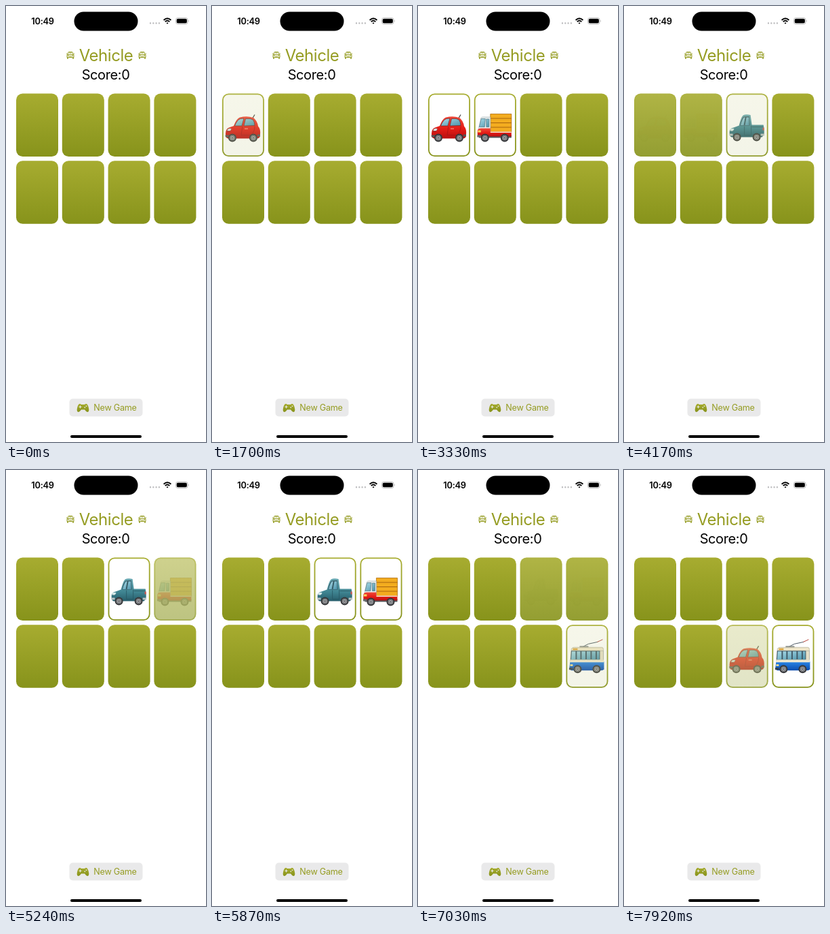
An HTML page for the animation above (8000 ms loop, 295x640 px).

```html
<!DOCTYPE html>
<html lang="en">
<head>
<meta charset="utf-8">
<title>Vehicle memory game</title>
<style>
  html, body { margin: 0; width: 100%; height: 100%; overflow: hidden; background: #fff; }
  svg { display: block; width: 100%; height: 100%; }
  text { font-family: Inter, "Open Sans", sans-serif; text-anchor: middle; letter-spacing: -.02em; }
</style>
</head>
<body>
<svg viewBox="0 0 295 640">
  <defs>
    <linearGradient id="olive" x2="0" y2="1">
      <stop stop-color="#a7ac30"/><stop offset="1" stop-color="#87931b"/>
    </linearGradient>
    <linearGradient id="red" x2="0" y2="1">
      <stop stop-color="#f0493a"/><stop offset=".55" stop-color="#e51d17"/><stop offset="1" stop-color="#b80f10"/>
    </linearGradient>
    <linearGradient id="teal" x2="0" y2="1">
      <stop stop-color="#6aa9b3"/><stop offset=".6" stop-color="#3f8491"/><stop offset="1" stop-color="#265c6a"/>
    </linearGradient>
    <linearGradient id="glass" x2="1" y2="1">
      <stop stop-color="#a9dbe8"/><stop offset="1" stop-color="#4d93ab"/>
    </linearGradient>
    <linearGradient id="blue" x2="0" y2="1">
      <stop stop-color="#2a86e6"/><stop offset="1" stop-color="#0b4cae"/>
    </linearGradient>
    <g id="wheel">
      <circle r="6" fill="#38393c"/><circle r="3.8" fill="#a9abae"/>
      <circle r="2.8" fill="none" stroke="#626468"/><circle r="1" fill="#4a4b4e"/>
    </g>
    <g id="car">
      <path d="M45 36L48 31" stroke="#444" stroke-width="1.3"/>
      <path fill="url(#red)" d="M5 59Q5 52 10 50L17 47.500Q21 37 26 35Q37 32.500 46 35.500Q52 40 53 48Q57 52 56 61Q56 66 51 66H9Q5 66 5 59Z"/>
      <path fill="url(#glass)" stroke="#71201f" stroke-width=".7" d="M18.500 47.500Q22 38.500 27 37L32 36.500L29 47.500ZM32 47.500L34.500 37Q42 36 45.500 38.500Q48 42 48 47Z"/>
      <path fill="none" stroke="#a81514" stroke-width=".8" d="M30 48L28 61H42Q48 57 48 48M6 56H12"/>
      <path fill="#dce9ec" stroke="#8d2525" stroke-width=".6" d="M8 52Q12 50 14 52L12 55H7Z"/>
      <path fill="#555" d="M4.500 61H10V64H5ZM52 60H56V63H52Z"/>
      <path fill="#f78b7b" d="M33 51H38V52.300H33Z"/>
      <use href="#wheel" x="15" y="65"/><use href="#wheel" x="46" y="65"/>
    </g>
    <g id="truck">
      <path fill="#525458" d="M7 61H55V65H7Z"/>
      <path fill="#f3ac1f" stroke="#ae6e10" stroke-width=".8" d="M24 30H55V57H24Z"/>
      <path stroke="#a8650f" d="M24 36.500H55M24 43H55M24 49.500H55"/>
      <path fill="#e8edee" stroke="#9da9ad" stroke-width=".6" d="M6 54L10 36Q10.500 34.500 13 34.500H24V56H6Z"/>
      <path fill="url(#glass)" stroke="#517784" stroke-width=".7" d="M7.500 49L10.500 37H16.500L15.500 49ZM18 37.500H22V49H18Z"/>
      <path fill="url(#red)" d="M5 54Q6 51 10 51H24V56H55V63H6Q4.500 63 5 54Z"/>
      <path fill="#f9d25a" d="M5.500 54H10V57H5.500Z"/>
      <path fill="#eee8d4" d="M24 56H55V57.500H24Z"/>
      <path fill="#67696c" d="M4.500 61H10V64H4.500Z"/>
      <use href="#wheel" x="16" y="65"/><use href="#wheel" x="45" y="65"/>
    </g>
    <g id="pickup">
      <path fill="url(#teal)" d="M5 57Q5 51 11 50L19 47Q22 35 25 32Q29 30 36 31.500L38 46H55Q56.500 51 56 60L53 64H8Q5 63 5 57Z"/>
      <path fill="#365b66" d="M20.500 47Q23 36 26 34L34 33.500L35 47Z"/>
      <path fill="url(#glass)" d="M21.500 46.500Q24 37 26.500 35L28 35L26 46.500ZM28 46.500L30 35H33.500L34 46.500Z"/>
      <path fill="none" stroke="#285762" stroke-width=".8" d="M27 48V61H37V47M38 49H54M6 55H11"/>
      <path fill="#d7e9e9" d="M6 52Q10 50.500 12 52L10 55H6Z"/>
      <path fill="#d6554b" d="M54 50H56V54H54Z"/>
      <path fill="#b9c2c4" d="M4.500 59H10V62H5ZM51 59H56.500V62H51Z"/>
      <use href="#wheel" x="16" y="64"/><use href="#wheel" x="45" y="64"/>
    </g>
    <g id="bus">
      <path fill="none" stroke="#4d5964" d="M25 32L33 28L47 25"/>
      <path fill="none" stroke="#b9483f" d="M46 25.200L54 21.500"/>
      <path fill="#8e938f" d="M20 31H33V34H20Z"/>
      <path fill="#eee5c9" stroke="#aaa58e" stroke-width=".6" d="M8 35Q9 33 12 33H53Q55 33 55 36V57H6Z"/>
      <path fill="#d9a23c" d="M10 34.500H17V37H10Z"/>
      <path fill="#405966" d="M7.500 38H55V51H6.500Z"/>
      <path fill="url(#glass)" d="M8.500 39H14V51H7.500ZM16 39H21V51H16ZM23 39H28.500V51H23ZM30.500 39H36V51H30.500ZM38 39H43.500V51H38ZM45.500 39H49V51H45.500Z"/>
      <path fill="#e6dfc7" d="M50 38H55V56H50Z"/>
      <path fill="url(#blue)" d="M6 54H56V65Q55 67 52 67H8Q5 66 5 62Z"/>
      <path fill="#f2ead2" d="M5.800 52.500H55.500V55H5.500Z"/>
      <path fill="#ffe58c" d="M6 58H10V60.500H6Z"/>
      <path fill="#333f4b" d="M4.500 63H10V66H4.500Z"/>
      <use href="#wheel" x="17" y="65"/><use href="#wheel" x="45" y="65"/>
    </g>
    <g id="carIcon" fill="none" stroke="#969d24">
      <path d="M-4 -1L-2.800 -4.500H2.800L4 -1M-5 -.500H5V3.500H-5ZM-6 -2H-4.500M4.500 -2H6M-2 2H2M-2 -3H2"/>
      <path fill="#969d24" stroke="none" d="M-5 3H-3V5.500H-5ZM3 3H5V5.500H3ZM-4 .500H-2.500V2H-4ZM2.500 .500H4V2H2.500Z"/>
    </g>
  </defs>

  <text x="54" y="26.500" font-size="12.800" font-weight="600">10:49</text>
  <rect x="100.500" y="8.500" width="94" height="28" rx="14"/>
  <path d="M213 25.300H227" stroke="#bdbdbf" stroke-width="2.400" stroke-linecap="round" stroke-dasharray="0 4.300"/>
  <g fill="none" stroke="#000" stroke-width="1.900">
    <path d="M232.600 20.800Q238 15.600 243.400 20.800M234.700 23.100Q238 20 241.300 23.100"/>
    <path d="M238 26.500L236.500 24.900Q238 23.700 239.500 24.900Z" fill="#000" stroke="none"/>
  </g>
  <rect x="250.500" y="17.500" width="17.500" height="9" rx="2.800" fill="none" stroke="#aaa" stroke-width=".8"/>
  <rect x="251.700" y="18.700" width="15.100" height="6.600" rx="1.800"/>
  <path d="M269 20.500Q270.500 22 269 23.500Z" fill="#aaa"/>

  <use href="#carIcon" x="95" y="72"/><use href="#carIcon" x="201" y="72"/>
  <text x="147.500" y="81" font-size="24" fill="#959c22">Vehicle</text>
  <text x="147" y="107.500" font-size="20">Score:0</text>
  <g id="cards"></g>

  <rect x="93.500" y="576.500" width="108" height="26" rx="5" fill="#e9e9ea"/>
  <path fill="url(#olive)" d="M108 584Q110 583.500 111 585H116Q117 583.500 119 584Q121.500 586 122.300 592Q122.500 596 120 596Q118 595.500 116 592.500H111Q109 595.500 107 596Q104.500 596 104.700 592Q105.500 586 108 584Z"/>
  <path d="M107.500 588.500H111.500M109.500 586.500V590.500" stroke="#e9e9ea" stroke-width="1.100"/>
  <g fill="#e9e9ea"><circle cx="116.300" cy="589.300" r=".9"/><circle cx="118.500" cy="587.300" r=".9"/></g>
  <text x="161" y="594.300" font-size="12.600" fill="#959c22">New Game</text>
  <rect x="95" y="630" width="105" height="4" rx="2"/>
</svg>
<script>
const LOOP = 8000, STEP = 103, LEAD = 30;
const vehicles = ["car", "truck", "pickup", "truck", "bus", "pickup", "car", "bus"];
// Each entry: time of the tap, then the cards that are face up after it.
const turns = [[0, []], [1390, [0]], [2500, [0, 1]], [3820, [2]], [5120, [2, 3]], [6710, [7]], [7700, [6, 7]]];

const table = document.getElementById("cards");
table.innerHTML = vehicles.map((name, i) => `
  <g transform="translate(${15 + i % 4 * 67.8} ${128.5 + (i > 3) * 98.8})">
    <g class="front">
      <rect x=".9" y=".9" width="60.200" height="90.700" rx="8.600" fill="#fff" stroke="url(#olive)" stroke-width="1.800"/>
      <use href="#${name}"/>
    </g>
    <rect class="back" width="62" height="92.500" rx="9.500" fill="url(#olive)"/>
  </g>`).join("");
const fronts = table.querySelectorAll(".front");
const backs = table.querySelectorAll(".back");

// Critically damped spring with a 0.55 s response.
function spring(ms) {
  const x = 2 * Math.PI * ms / 550;
  return 1 - (1 + x) * Math.exp(-x);
}

function draw(now) {
  const t = now % LOOP;
  const current = turns.findLastIndex(turn => t >= turn[0]);
  const [start, faceUp] = turns[current];
  const before = current ? turns[current - 1][1] : [];
  const step = Math.floor((t - start) / STEP);
  const progress = step > 7 ? 1 : spring(step * STEP + LEAD);
  vehicles.forEach((_, i) => {
    const from = +before.includes(i), to = +faceUp.includes(i);
    const shown = from + (to - from) * progress;
    fronts[i].style.opacity = shown;
    backs[i].style.opacity = 1 - shown;
  });
}

const begin = performance.now();
function tick() {
  draw(performance.now() - begin);
  requestAnimationFrame(tick);
}
tick();
</script>
</body>
</html>
```
